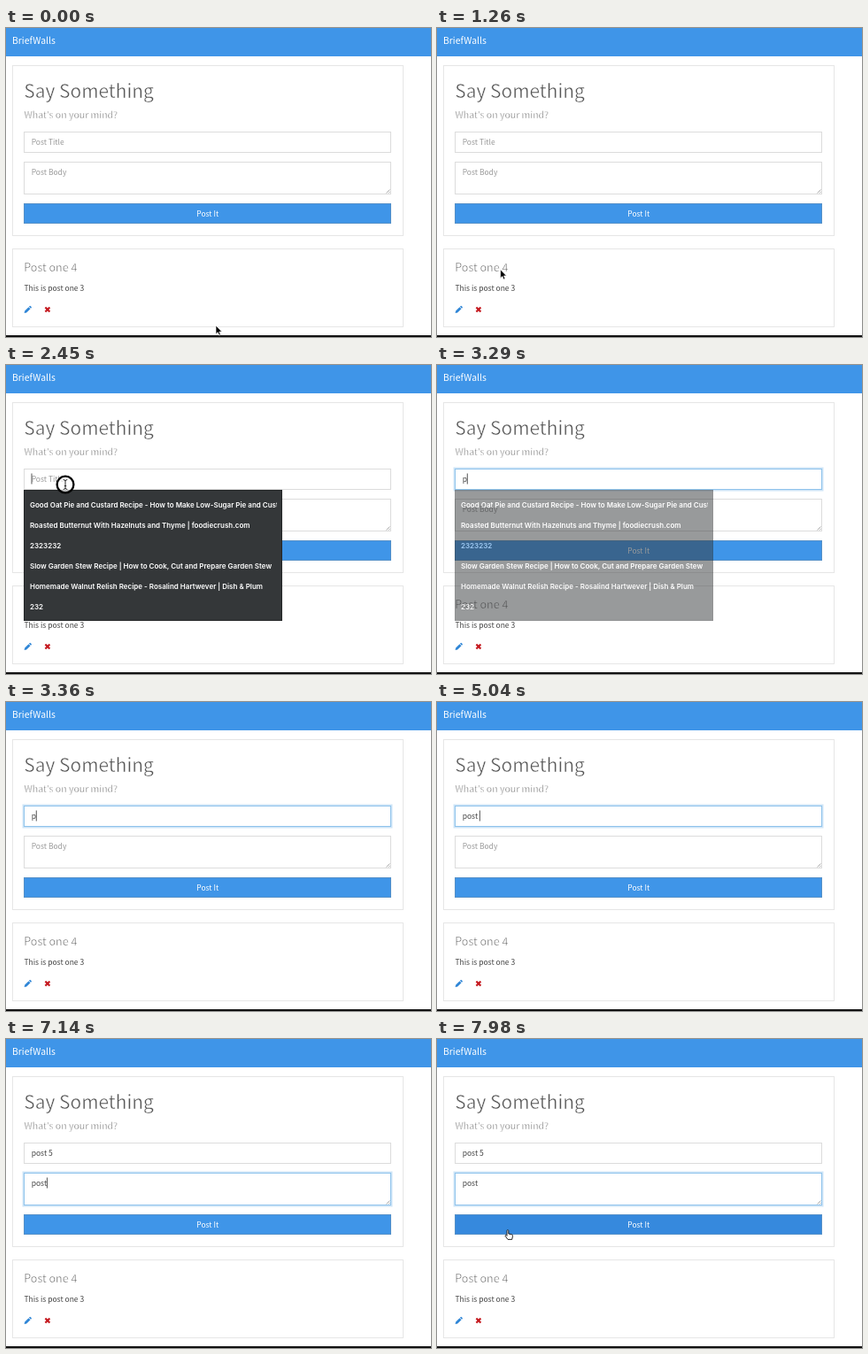
An HTML page that plays this animation: 480 by 349 pixels, repeating every 8000 ms.

```html
<!DOCTYPE html>
<html lang="en">
<head>
<meta charset="utf-8">
<title>Post form</title>
<style>
  html, body { margin: 0; height: 100%; overflow: hidden; background: #fff; }
  svg { display: block; width: 480px; height: 349px; }
  text { font: 400 8.5px "Noto Sans CJK SC", "Noto Sans CJK JP", "Open Sans", sans-serif; fill: #444; white-space: pre; }
  text.light { fill: #555; stroke: #fff; stroke-width: .45px; }
  text.hint { fill: #999; }
  text.white { fill: #fff; }
  #menu text { font: 600 8px Inter, sans-serif; fill: #fff; }
  .card { fill: none; stroke: #e6e6e6; }
  .field { fill: #fff; stroke: #dcdcdc; }
  .glow { fill: none; stroke: #cfe5f7; stroke-width: 4; }
  .edge { fill: none; stroke: #8fc3ec; }
</style>
</head>
<body>
<svg viewBox="0 0 480 349">
  <defs>
    <clipPath id="menuClip"><rect x="20" y="141" width="286" height="148"/></clipPath>
    <path id="beam" d="M-2.3-5.4Q0-5.4 0-4Q0-5.4 2.3-5.4M0-4V4M-2.3 5.4Q0 5.4 0 4Q0 5.4 2.3 5.4M-1.2 1.6H1.2"/>
  </defs>

  <rect width="480" height="32" fill="#3f95e8"/>
  <text class="white" x="7" y="18.3" style="font-size:10.35px">BriefWalls</text>

  <rect class="card" x="7.5" y="42.5" width="441" height="192"/>
  <text class="light" x="20.3" y="79.1" style="font-size:20.9px">Say Something</text>
  <text class="light" x="20.6" y="102" style="font-size:10.5px">What's on your mind?</text>
  <g id="fields"></g>
  <path d="M429.5 186.5l4-4M432 186.5l1.5-1.5" stroke="#888" stroke-width=".7"/>
  <rect id="caret" width="1" height="12" fill="#555"/>
  <rect id="button" x="20.5" y="198.5" width="414" height="22" stroke="#5590c8"/>
  <text class="white" x="227.7" y="213" text-anchor="middle">Post It</text>

  <rect class="card" x="7.5" y="249.5" width="441" height="88"/>
  <text class="light" x="20.3" y="275.2" style="font-size:12.5px">Post one 4</text>
  <text x="20.5" y="297">This is post one 3</text>
  <path d="M20.6 322l.6-2.5 4.3-4.3 2 2-4.3 4.3zM26 314.7l.7-.7q.5-.4 1 0l1 1q.4.5 0 1l-.7.7z" fill="#2f86d6"/>
  <path d="M44.4 315.6l5 5m0-5l-5 5" stroke="#c4161c" stroke-width="2.1"/>
  <rect y="347" width="480" height="2" fill="#111"/>

  <g id="menu">
    <rect x="20.5" y="141.5" width="291" height="147" fill="#343739" stroke="#252829"/>
    <g id="rows" clip-path="url(#menuClip)"></g>
  </g>

  <g id="cursor">
    <circle id="ring" r="9.4" fill="#fff" fill-opacity=".65" stroke="#000" stroke-width="2.3"/>
    <path class="shape" d="M0 0V9.8L2.2 7.7 3.7 11.1 5.4 10.4 3.9 7.1H6.9Z" stroke="#fff" stroke-width=".7"/>
    <g class="shape" fill="none">
      <use href="#beam" stroke="#fff" stroke-width="2"/>
      <use href="#beam" stroke="#111" stroke-width=".9"/>
    </g>
    <path class="shape" d="M0 .6C0-.7 1.8-.7 1.8.6V4L5.4 4.8Q6.8 5.1 6.5 6.7L5.7 10.4H1L-1.8 6.7C-2.4 5.6-1.2 5-.5 5.8L0 6.3Z" fill="#fff" stroke="#111" stroke-width=".9"/>
  </g>
</svg>
<script>
const LOOP = 8000, STEP = 70, BLINK = 530, FADE = 2 * STEP;
const $ = id => document.getElementById(id);
const all = selector => [...document.querySelectorAll(selector)];
const clamp = v => Math.min(1, Math.max(0, v));

const fields = [
  { hint: 'Post Title', y: 117.5, height: 23, clicked: 2450 },
  { hint: 'Post Body', y: 151.5, height: 36, clicked: 5810 }
];
const suggestions = [
  'Good Oat Pie and Custard Recipe - How to Make Low-Sugar Pie and Custard',
  'Roasted Butternut With Hazelnuts and Thyme | foodiecrush.com',
  '2323232',
  'Slow Garden Stew Recipe | How to Cook, Cut and Prepare Garden Stew',
  'Homemade Walnut Relish Recipe - Rosalind Hartwever | Dish &amp; Plum',
  '232'
];
const moves = [
  { from: 0, to: 630, x: 113, y: 138 },
  { from: 700, to: 910, x: 72, y: 276 },
  { from: 1190, to: 1590, x: 53, y: 128 },
  { from: 1680, to: 1890, x: 67, y: 135 },
  { from: 5530, to: 5810, x: 60, y: 161 },
  { from: 7420, to: 7980, x: 79, y: 216 }
];

const type = (field, text, start, every = 0) =>
  [...text].map((char, i) => ({ field, char, at: start + i * every }));
const keys = [...type(0, 'post ', 3290, 155), ...type(0, '5', 5180), ...type(1, 'post', 6580, 185)];

$('fields').innerHTML = fields.map(({ y, height }) => {
  const box = name => `<rect class="${name}" x="20.5" y="${y}" width="414" height="${height}"/>`;
  return `<g class="focus">${box('glow')}</g>${box('field')}<g class="focus">${box('edge')}</g>
    <text class="entry" x="28.7" y="${y + 14.8}"></text>`;
}).join('');
$('rows').innerHTML = suggestions.map((label, i) => `<text x="27" y="${161 + 23 * i}">${label}</text>`).join('');
const entries = all('.entry'), focusMarks = all('.focus'), shapes = all('.shape');

function pointer(t) {
  let x = 237, y = 336;
  for (const m of moves) {
    const u = clamp((t - m.from) / (m.to - m.from));
    const ease = u < .5 ? 4 * u ** 3 : 1 - 4 * (1 - u) ** 3;
    x += (m.x - x) * ease;
    y += (m.y - y) * ease;
  }
  return [x, y];
}

function drawForm(t, pressed) {
  const active = fields.findLastIndex(f => t >= f.clicked);
  const lastInput = Math.max(...fields.concat().map(f => f.clicked).concat(pressed.map(k => k.at)).filter(at => at <= t));
  fields.forEach((field, i) => {
    const value = pressed.filter(k => k.field === i).map(k => k.char).join('');
    entries[i].textContent = value || field.hint;
    entries[i].classList.toggle('hint', !value);
    const next = fields[i + 1] ? fields[i + 1].clicked : LOOP;
    const focus = clamp((t - field.clicked) / FADE) - clamp((t - next) / FADE);
    focusMarks.slice(2 * i, 2 * i + 2).forEach(mark => mark.style.opacity = focus);
    if (i === active) {
      $('caret').setAttribute('x', 28.5 + (value ? entries[i].getComputedTextLength() : 0));
      $('caret').setAttribute('y', field.y + 5);
    }
  });
  $('caret').style.opacity = active >= 0 && (t - lastInput) % (2 * BLINK) < BLINK ? 1 : 0;
  $('menu').style.opacity = t < fields[0].clicked ? 0 : clamp(1 - (t - keys[0].at + STEP) / FADE);
}

function drawPointer(t, pressed) {
  const [x, y] = pointer(t);
  const lastMove = moves.findLast(m => m.from <= t);
  const hidden = pressed.some(k => k.at > lastMove.from);
  const overButton = !hidden && y > 198 && y < 221;
  const overField = fields.some(f => y > f.y && y < f.y + f.height);
  const kind = overButton ? 2 : overField ? 1 : 0;
  shapes.forEach((shape, i) => shape.style.display = i === kind ? '' : 'none');
  $('cursor').style.display = hidden ? 'none' : '';
  $('cursor').setAttribute('transform', `translate(${x} ${y})`);
  $('ring').style.opacity = fields.some(f => t >= f.clicked && t < f.clicked + FADE) ? 1 : 0;
  $('button').setAttribute('fill', overButton ? '#3689dd' : '#3f95e8');
}

function draw(t) {
  const pressed = keys.filter(k => k.at <= t);
  drawForm(t, pressed);
  drawPointer(t, pressed);
}

const start = performance.now();
function tick() {
  const t = (performance.now() - start) % LOOP;
  draw(Math.floor(t / STEP) * STEP);
  requestAnimationFrame(tick);
}
tick();
</script>
</body>
</html>
```
